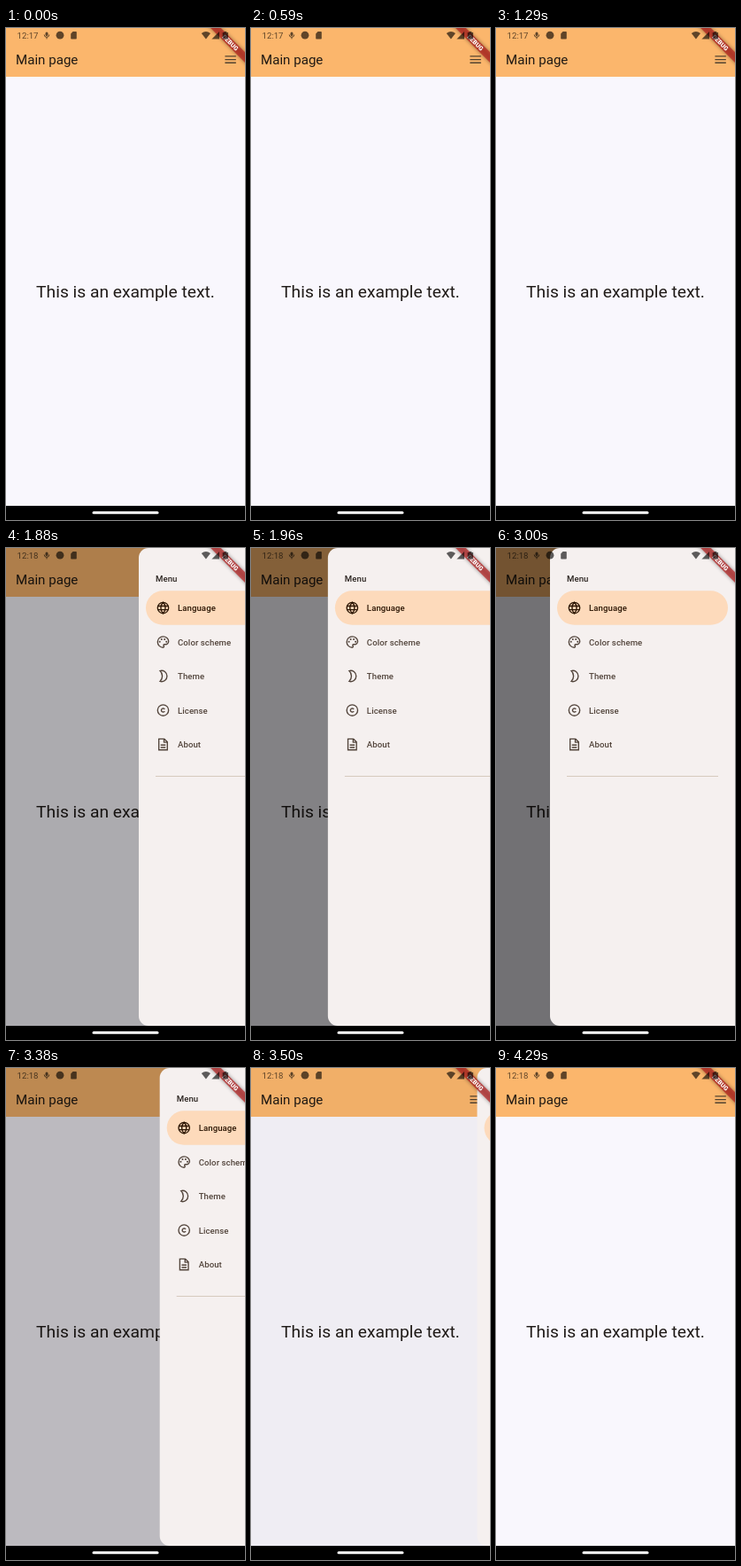
Animation of 270x555 px, one loop 4.46 s. Source, as an HTML page:

```html
<!DOCTYPE html>
<html lang="en">
<head>
<meta charset="utf-8">
<title>Drawer menu</title>
<style>
  html, body { margin: 0; width: 100%; height: 100%; overflow: hidden; background: #000; }
  svg { display: block; width: 100%; height: 100%; font-family: Roboto, sans-serif; }
  .icon { fill: none; stroke: currentColor; stroke-width: 2; }
  .icon .solid { fill: currentColor; stroke: none; }
  .label { font-size: 9.625px; font-weight: 500; letter-spacing: .07px; fill: currentColor; }
</style>
</head>
<body>
<svg viewBox="0 0 270 555">
  <defs>
    <clipPath id="screen"><rect width="270" height="539"/></clipPath>
    <filter id="soft" x="-20%" y="-100%" width="140%" height="300%"><feGaussianBlur stdDeviation="2"/></filter>
  </defs>

  <g clip-path="url(#screen)">
    <rect width="270" height="539" fill="#f9f7fd"/>
    <rect width="270" height="55" fill="#fbb66c"/>
    <text x="11" y="40.6" font-size="15.125" fill="#211a14">Main page</text>
    <path d="M247.4 31.9h12.4M247.4 35.6h12.4M247.4 39.3h12.4" stroke="#52422f" stroke-width="1.4"/>
    <text x="135" y="304" font-size="19.25" text-anchor="middle" fill="#201b18">This is an example text.</text>
    <rect id="scrim" width="270" height="539" opacity="0"/>

    <g id="drawer" transform="translate(270)">
      <rect width="220" height="539" rx="11" fill="#f5f0ef"/>
      <text class="label" x="19" y="38" color="#2b2420">Menu</text>
      <rect x="8" y="48.3" width="193" height="38.5" rx="19.25" fill="#fddabb"/>
      <g id="items"></g>
      <path d="M19 257.5H190" stroke="#d6c9be"/>
    </g>

    <g transform="translate(270) rotate(45)">
      <rect x="-42" y="19.25" width="84" height="8.25" opacity=".4" filter="url(#soft)"/>
      <rect x="-42" y="19.25" width="84" height="8.25" fill="#b71c1c" fill-opacity=".68"/>
      <text y="25.9" font-size="7" font-weight="900" text-anchor="middle" fill="#fff">DEBUG</text>
    </g>

    <g opacity=".62">
      <text id="clock" x="12.6" y="11.8" font-size="9.6">12:17</text>
      <rect x="44.5" y="4.5" width="3" height="4.5" rx="1.5"/>
      <path d="M43.2 7.5a2.8 2.8 0 0 0 5.6 0M46 10v2.4" fill="none" stroke="#000"/>
      <circle cx="61" cy="8.2" r="4.4"/>
      <path d="M75.5 4H79q.8 0 .8.8v7q0 .8-.8.8h-5q-.8 0-.8-.8V6.5z"/>
      <path d="M220.8 6q5-4 10.2 0l-5.1 6.4z"/>
      <path d="M241 4v8.4h-8.6z"/>
      <path d="M246.4 4h2.8v.9h1.7v7.7h-6.2V4.9h1.7z"/>
    </g>
  </g>
  <rect y="539" width="270" height="16"/>
  <rect x="97.5" y="545.3" width="75" height="3" rx="1.5" fill="#fff"/>
</svg>

<script>
const LOOP = 4460, FPS = 24;
const OPEN_AT = 1780, CLOSE_AT = 3286, MINUTE_AT = 1500;
const DRAWER_WIDTH = 209, SCRIM = 0.54, STIFFNESS = 0.0203;
const $ = id => document.getElementById(id);

const ring = '<circle cx="12" cy="12" r="9"/>';
const dot = (x, y) => `<circle class="solid" cx="${x}" cy="${y}" r="1.5"/>`;
const items = [
  ['Language', ring + '<path d="M12 3c-5 5-5 13 0 18c5-5 5-13 0-18zM4 9h16M4 15h16"/>'],
  ['Color scheme', '<path d="M12 21a9 9 0 1 1 0-18c5 0 9 3.6 9 8a5 5 0 0 1-5 5h-1.8c-1.3 0-2 1.5-1.1 2.5c.9 1 .3 2.5-1.1 2.5z"/>'
    + dot(6.5, 11.5) + dot(9.5, 7.5) + dot(14.5, 7.5) + dot(17.5, 11.5)],
  ['Theme', '<path d="M7 3.35a9 9 0 1 1 0 17.3a12 12 0 0 0 0-17.3z"/>'],
  ['License', ring + '<path d="M14.6 10.4a3 3 0 1 0 0 3.2"/>'],
  ['About', '<path d="M5 3h9l5 5v13H5zM13.5 3v5.5H19M8 13h8M8 17h8"/>']
];
$('items').innerHTML = items.map(([label, icon], i) => `
  <g transform="translate(0 ${67.5 + i * 38.5})" color="${i ? '#52443b' : '#2d1705'}">
    <g class="icon" transform="translate(19.25 -8.25) scale(.6875)">${icon}</g>
    <text class="label" x="44" y="3.5">${label}</text>
  </g>`).join('');

// Critically damped spring from 0 to 1.
function spring(ms) {
  const x = Math.max(0, ms) * STIFFNESS;
  return 1 - (1 + x) * Math.exp(-x);
}

// Time of the current step; steps begin on whole hundredths of a second.
function stepTime(ms) {
  let step = Math.ceil(ms * FPS / 1000) + 1;
  while (Math.round(step * 100 / FPS) * 10 > ms) step--;
  return step * 1000 / FPS;
}

function draw(now) {
  const t = stepTime(now % LOOP);
  const open = t < CLOSE_AT ? spring(t - OPEN_AT) : 1 - spring(t - CLOSE_AT);
  $('drawer').setAttribute('transform', `translate(${270 - DRAWER_WIDTH * open})`);
  $('scrim').setAttribute('opacity', SCRIM * open);
  $('clock').textContent = t < MINUTE_AT ? '12:17' : '12:18';
}

const start = performance.now();
function tick() {
  draw(performance.now() - start);
  requestAnimationFrame(tick);
}
tick();
</script>
</body>
</html>
```
